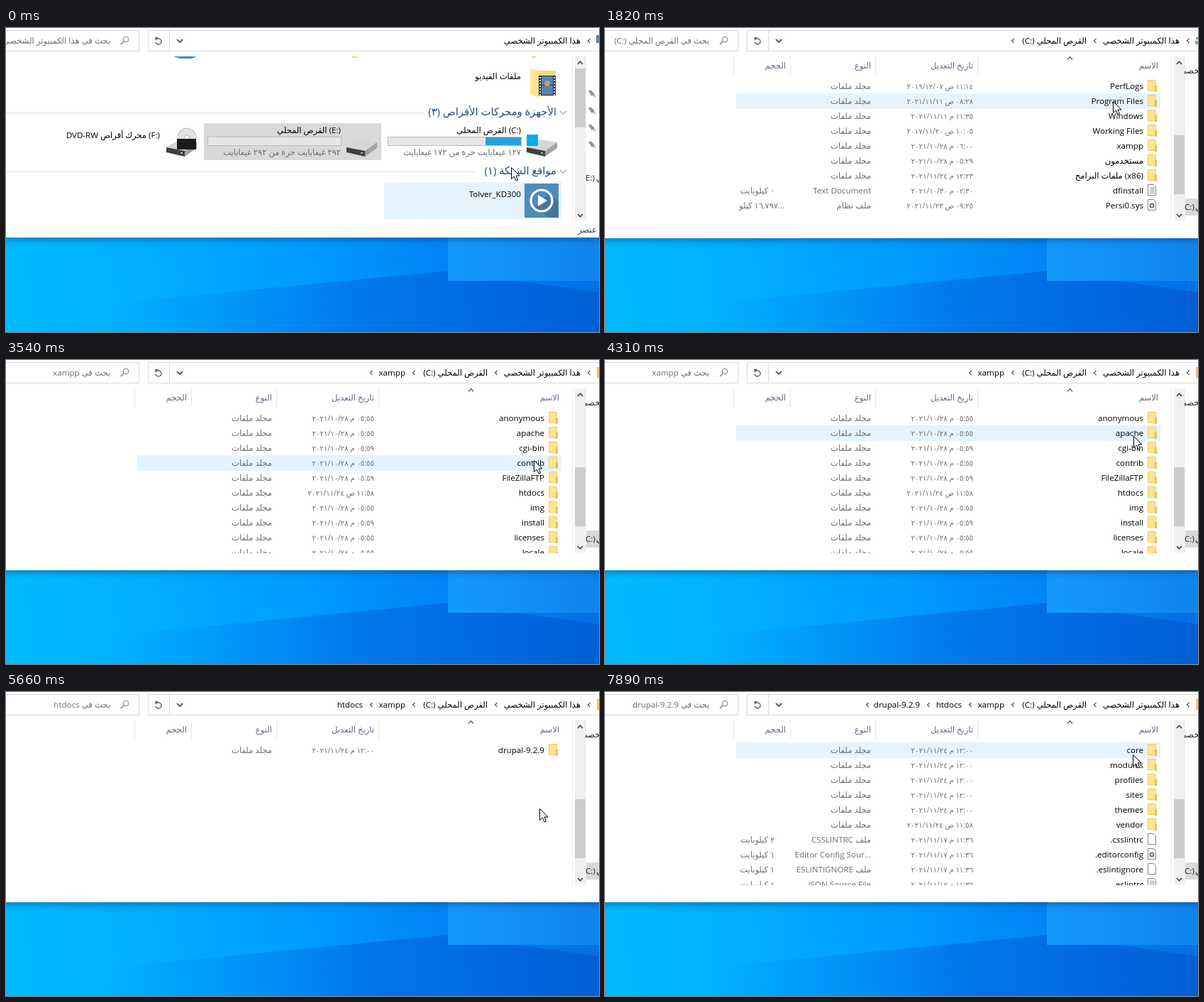
These frames come from a looping animation (836x428 px, 7.99 s). An HTML page with a canvas:

```html
<!DOCTYPE html>
<html lang="ar">
<head>
<meta charset="utf-8">
<style>
  html, body { margin: 0; width: 100%; height: 100%; overflow: hidden; background: #fff; }
  canvas { display: block; }
</style>
</head>
<body>
<canvas id="stage" width="836" height="428"></canvas>
<script>
const ctx = document.getElementById('stage').getContext('2d');
const LOOP = 7990;
const GRAY = '#6d6d6d', HEAD = '#6a6286', HOVER = '#e5f3ff', SELECTED = '#cce8ff';
const arabicDigits = s => s.replace(/\d/g, d => String.fromCharCode(0x660 + +d));
const isolate = s => '\u2066' + s + '\u2069';

// ---- folder contents -------------------------------------------------
const item = (name, time, date, kind = 'folder', type = 'مجلد ملفات', size = '') =>
  ({ name, stamp: arabicDigits(time + ' ' + date), kind, type, size: arabicDigits(size) });

const driveRows = [
  item('PerfLogs', '11:14 ص', '2019/12/07'),
  item('Program Files', '08:28 ص', '2021/11/11'),
  item('Windows', '11:35 م', '2021/11/11'),
  item('Working Files', '10:05 ص', '2017/11/20'),
  item('xampp', '06:00 م', '2021/10/28'),
  item('مستخدمون', '05:29 م', '2021/10/28'),
  item(isolate('(x86)') + ' ملفات البرامج', '12:23 م', '2021/11/24'),
  item('dfinstall', '02:30 م', '2021/10/30', 'text', 'Text Document', '0 كيلوبايت'),
  item('Persi0.sys', '09:25 ص', '2021/11/23', 'gear', 'ملف نظام', '...16,797 كيلو')
];
const xamppRows = ['anonymous', 'apache', 'cgi-bin', 'contrib', 'FileZillaFTP', 'htdocs',
  'img', 'install', 'licenses', 'locale'].map(name => name === 'htdocs'
  ? item(name, '11:58 ص', '2021/11/24')
  : item(name, /cgi|Zilla|install/.test(name) ? '05:59 م' : '05:55 م', '2021/10/28'));
const htdocsRows = [item('drupal-9.2.9', '12:00 م', '2021/11/24')];
const drupalRows = [
  ...['core', 'modules', 'profiles', 'sites', 'themes'].map(n => item(n, '12:00 م', '2021/11/24')),
  item('vendor', '11:58 ص', '2021/11/24'),
  ...[['.csslintrc', 'page', 'ملف CSSLINTRC', '2'], ['.editorconfig', 'gear', 'Editor Config Sour...', '1'],
    ['.eslintignore', 'page', 'ملف ESLINTIGNORE', '1'], ['.eslintrc', 'text', 'JSON Source File', '1']]
    .map(([n, kind, type, kb]) => item(n, '11:36 م', '2021/11/17', kind, type, kb + ' كيلوبايت'))
];

const PC = 'هذا الكمبيوتر الشخصي', DISK = 'القرص المحلي ' + isolate('(C:)');
const crumbs = [[PC, 810], [DISK, 679], ['xampp', 563], ['htdocs', 503], ['drupal-9.2.9', 444]];
const chevrons = [822, 691, 575, 515, 456, 370];

// "select" is when the opened item is clicked, just before the next view starts.
const views = [
  { start: 0, depth: 1, select: 950 },
  { start: 1100, depth: 1, rows: [], busy: true, select: 1100 },
  { start: 1450, depth: 2, rows: driveRows, select: 2820 },
  { start: 3130, depth: 3, rows: xamppRows, select: 5080 },
  { start: 5400, depth: 4, rows: htdocsRows, select: 7260 },
  { start: 7500, depth: 5, rows: drupalRows, select: Infinity }
];

const pointerKeys = [
  [0, 712, 196], [69, 712, 196], [70, 678, 137], [400, 678, 137], [620, 688, 150],
  [1400, 688, 150], [1710, 712, 119], [1820, 716, 103], [2080, 716, 103], [2560, 735, 167],
  [3080, 735, 167], [3400, 743, 144], [3540, 744, 141], [4060, 745, 103], [4280, 745, 103],
  [4860, 748, 182], [5600, 750, 182], [5660, 752, 164], [5860, 748, 126], [6110, 748, 126],
  [6460, 744, 88], [LOOP, 744, 88]
];
function pointerAt(t) {
  const i = pointerKeys.findIndex(k => k[0] > t);
  const [t0, x0, y0] = pointerKeys[i - 1], [t1, x1, y1] = pointerKeys[i];
  const p = (t - t0) / (t1 - t0);
  return [Math.round(x0 + (x1 - x0) * p), Math.round(y0 + (y1 - y0) * p)];
}

// ---- drawing helpers -------------------------------------------------
function rect(x, y, w, h, fill, stroke) {
  if (fill) { ctx.fillStyle = fill; ctx.fillRect(x, y, w, h); }
  if (stroke) { ctx.strokeStyle = stroke; ctx.lineWidth = 1; ctx.strokeRect(x + .5, y + .5, w - 1, h - 1); }
}
function shape(points, fill, stroke, width = 1, closed = true) {
  ctx.beginPath();
  points.forEach(([x, y]) => ctx.lineTo(x, y));
  if (closed) ctx.closePath();
  if (fill) { ctx.fillStyle = fill; ctx.fill(); }
  if (stroke) { ctx.strokeStyle = stroke; ctx.lineWidth = width; ctx.stroke(); }
}
function circle(x, y, r, fill, stroke, width = 1) {
  ctx.beginPath();
  ctx.arc(x, y, r, 0, 7);
  if (fill) { ctx.fillStyle = fill; ctx.fill(); }
  if (stroke) { ctx.strokeStyle = stroke; ctx.lineWidth = width; ctx.stroke(); }
}
function gradient(x0, y0, x1, y1, ...stops) {
  const g = ctx.createLinearGradient(x0, y0, x1, y1);
  stops.forEach((color, i) => g.addColorStop(i / (stops.length - 1), color));
  return g;
}
const line = (points, color, width) => shape(points, null, color, width, false);

// Text is centred on y; x is the right edge unless align says otherwise.
function text(s, x, y, color = '#000', size = 11.6, align = 'right') {
  ctx.font = `${size}px "Open Sans", "DejaVu Sans", sans-serif`;
  ctx.direction = /[\u0600-\u06ff]/.test(s) ? 'rtl' : 'ltr';
  ctx.textAlign = align;
  ctx.fillStyle = color;
  ctx.fillText(s, x, y + 4);
}
function clipped(x, y, w, h, draw) {
  ctx.save();
  ctx.beginPath();
  ctx.rect(x, y, w, h);
  ctx.clip();
  draw();
  ctx.restore();
}
const caret = (x, y, dx, dy, color, width = 1) =>
  line([[x - dx, y - dy], [x, y + dy], [x + dx, y - dy]], color, width);
const backChevron = (x, y) => line([[x + 1.5, y - 3], [x - 1.5, y], [x + 1.5, y + 3]], '#555', 1.2);

// ---- desktop and window frame ----------------------------------------
function drawDesktop(top) {
  rect(0, top, 836, 428 - top,
    gradient(0, 400, 836, 330, '#00baff', '#00aeff', '#009cff', '#0084f4', '#0070e2'));
  shape([[0, 402], [623, 342], [836, 372], [836, 428], [0, 428]],
    gradient(150, 0, 836, 0, 'rgba(0,110,230,0)', 'rgba(0,90,212,.45)', 'rgba(0,80,200,.55)'));
  rect(623, top, 213, 356 - top, gradient(623, 0, 836, 0, '#1499fc', '#0f84ee'));
  rect(0, top, 836, 14, gradient(0, top, 0, top + 14, 'rgba(0,40,90,.32)', 'rgba(0,40,90,.08)', 'rgba(0,40,90,0)'));
}

function drawAddressBar(view, t) {
  rect(-5, 3, 193, 30, '#fff', '#d9d9d9');
  rect(200, 3, 640, 30, '#fff', '#d9d9d9');
  rect(230, 3, 1, 30, '#d9d9d9');
  circle(169, 16, 3.8, null, '#777');
  line([[166, 19], [162, 23]], '#777', 1.2);
  text('بحث في ' + crumbs[view.depth - 1][0], 147, 18, GRAY);

  ctx.beginPath();
  ctx.arc(215, 19, 4, -2.2, 3);
  ctx.strokeStyle = '#666';
  ctx.lineWidth = 1.5;
  ctx.stroke();
  shape([[210, 13], [215, 13], [211, 18]], '#666');
  caret(245, 18, 4, 2, '#555', 1.8);

  for (let i = 0; i < view.depth; i++) {
    text(crumbs[i][0], crumbs[i][1], 18);
    backChevron(chevrons[i], 18);
  }
  if (view.depth > 1 && t > view.start + 300) backChevron(chevrons[view.depth], 18);

  if (view.depth === 1) rect(832, 10, 4, 11, '#3aa0d8', '#6a7c8a');
  else if (view.depth === 2) { rect(833, 13, 3, 3, '#4cb4e4'); rect(832, 18, 4, 5, '#999'); }
  else rect(833, 10, 3, 15, '#ffe08a', '#e3b84c');
}

function drawTreeDisk(letter, y) {
  text(letter + ':)', 817, y, '#222', 11.6, 'left');
  text('ي', 841, y, '#222');
}
function drawSidebar(scrolled) {
  rect(798, 40, 1, 231, '#ececec');
  rect(802, 40, 16, 231, '#f0f0f0');
  rect(802, scrolled ? 151 : 57, 15, 83, '#cdcdcd');
  caret(809.5, 49, 3.5, -1.8, '#505050', 1.8);
  caret(809.5, 264, 3.5, 1.8, '#505050', 1.8);
  clipped(817, 40, 19, 232, () => {
    if (scrolled) {
      text('الشخصي', 855, 60, '#222');
      rect(818, 240, 18, 24, '#d9d9d9');
      drawTreeDisk('C', 252);
      drawTreeDisk('D', 276);
      return;
    }
    for (let y = 92; y < 170; y += 24) {
      shape([[821, y - 3], [824, y - 5], [830, y + 1], [826, y + 4]], '#8d969d');
      line([[827, y + 1], [831, y + 5]], '#8d969d', 1.2);
    }
    drawTreeDisk('E', 211);
  });
}

// ---- computer overview -----------------------------------------------
function drawDisk(x, y) {
  shape([[x, y + 11], [x + 19, y], [x + 43, y + 4], [x + 26, y + 16]], '#d6d6d6');
  shape([[x, y + 11], [x + 26, y + 16], [x + 26, y + 24], [x, y + 18]], '#3f3f3f');
  shape([[x + 26, y + 16], [x + 43, y + 4], [x + 43, y + 12], [x + 26, y + 24]], '#a2a2a2');
  rect(x + 20, y + 18, 3, 2, '#6fe05a');
}
function drawUsage(x, used, letter, free) {
  text(isolate(`(${letter}:)`) + ' القرص المحلي', x + 188, 144);
  rect(x, 153, 189, 13, '#e6e6e6', '#bcbcbc');
  rect(x + 188 - used, 154, used, 11, '#26a0da');
  text(arabicDigits(free), x + 188, 175, GRAY, 11.5);
}
function drawGroup(label, y, lineEnd) {
  text(label, 776, y, '#26488f', 14.8);
  rect(0, y, lineEnd, 1, '#dedede');
  caret(785.5, y, 4.5, 2.2, '#666');
}
function drawComputer(t, pointerY) {
  const opened = t >= 950;
  shape([[236, 40], [269, 40], [262, 43], [246, 43]], '#2f8fd0');
  rect(488, 40, 7, 2, '#f3cf72');
  rect(741, 40, 6, 2, '#f3cf72');

  text('ملفات الفيديو', 726, 68);
  rect(747, 60, 28, 36, '#f8d775');
  shape([[739, 57], [751, 60], [751, 98], [739, 94]], '#ffe594');
  rect(751, 67, 24, 28, '#333');
  rect(755, 68, 16, 12, '#4a86c8');
  rect(755, 81, 16, 13, '#5f82ad');
  circle(763, 78, 4, '#d99a4e');
  for (let y = 69; y < 94; y += 4) { rect(752, y, 2, 2, '#ddd'); rect(772, y, 2, 2, '#ddd'); }

  drawGroup('الأجهزة ومحركات الأقراص (٣)', 119, 588);
  drawGroup('مواقع الشبكة (١)', 202, 663);

  if (opened) rect(533, 134, 250, 52, SELECTED);
  else {
    if (pointerY < 186) rect(533, 134, 250, 52, HOVER);
    rect(279, 134, 250, 52, '#d9d9d9');
  }
  drawUsage(538, 50, 'C', '127 غيغابايت حرة من 172 غيغابايت');
  drawDisk(734, 157);
  rect(734, 150, 16, 16, '#00adef');
  drawUsage(284, 0, 'E', '292 غيغابايت حرة من 292 غيغابايت');
  drawDisk(480, 157);

  text(isolate('(F:)') + ' محرك أقراص DVD-RW', 217, 151);
  circle(255, 154, 13, '#dfe3e6', '#b5b9bc');
  circle(255, 154, 3.5, '#fff', '#aaa');
  drawDisk(226, 157);
  rect(241, 156, 27, 15, '#1c1c1c');

  if (pointerY > 186) rect(533, 217, 250, 52, HOVER);
  text('Tolver_KD300', 726, 234);
  rect(731, 219, 48, 48, '#4f8cba');
  shape([[766, 232], [779, 245], [779, 267], [767, 267], [744, 254]], '#41779f');
  circle(755, 243, 15, null, '#fff', 3.2);
  shape([[750, 235], [763, 243], [750, 251]], '#fff');
}

// ---- folder listing --------------------------------------------------
function drawIcon(kind, y) {
  if (kind === 'folder') {
    rect(765, y - 9, 12, 16, '#ffe391', '#efcb68');
    rect(775, y - 1, 3, 9, '#f4ce6c', '#e5b94f');
    return;
  }
  shape([[765.5, y - 8.5], [773.5, y - 8.5], [776.5, y - 5.5], [776.5, y + 6.5], [765.5, y + 6.5]], '#fff', '#858585');
  if (kind === 'text') for (let k = -5; k < 5; k += 2) rect(768, y + k, 7, 1, '#9aa4ae');
  if (kind === 'gear') circle(771, y, 2.5, null, '#5f7787', 2);
}
function drawListing(view, t, pointerY) {
  [['الاسم', 780], ['تاريخ التعديل', 519], ['النوع', 375], ['الحجم', 255]]
    .forEach(([label, x]) => text(label, x, 53, HEAD));
  [181, 261, 381, 525].forEach(x => rect(x, 40, 1, 26, '#e5e5e5'));
  caret(655.5, 42.5, 3.5, -1.8, '#444', 1.2);
  if (view.busy) text('قيد العمل...', 343, 88, GRAY);
  if (t < view.start + 80) return;

  const active = Math.floor((pointerY - 71) / 21);
  clipped(0, 66, 798, 206, () => view.rows.forEach((row, i) => {
    const y = 82 + 21 * i;
    if (i === active) rect(185, y - 11, 598, 22, t >= view.select ? SELECTED : HOVER);
    drawIcon(row.kind, y);
    text(row.name, 759, y);
    text(row.stamp, 519, y, GRAY, 10.2);
    text(row.type, 375, y, GRAY);
    text(row.size, row.size.startsWith('.') ? 253 : 239, y, GRAY, 11.4);
  }));
}

function drawPointer(x, y) {
  shape([[0, 0], [0, 16], [4, 12.5], [6.5, 18.5], [9, 17.5], [6.5, 11.5], [11.5, 11.5]]
    .map(([dx, dy]) => [x + .5 + dx, y + .5 + dy]), '#fff', '#000');
}

function render(t) {
  const view = views.filter(v => v.start <= t).pop();
  const [px, py] = pointerAt(t);
  const bottom = view.rows ? 296 : 295;
  rect(0, 0, 836, bottom, '#fff');
  drawDesktop(bottom);
  drawAddressBar(view, t);
  if (view.rows) drawListing(view, t, py);
  else clipped(0, 40, 798, 232, () => drawComputer(t, py));
  drawSidebar(!!view.rows);
  if (view.start < 1450 || t >= view.select) text('عنصر', 833, 284, '#2c3558');
  drawPointer(px, py);
}

function tick() {
  render(performance.now() % LOOP);
  requestAnimationFrame(tick);
}
tick();
</script>
</body>
</html>
```
